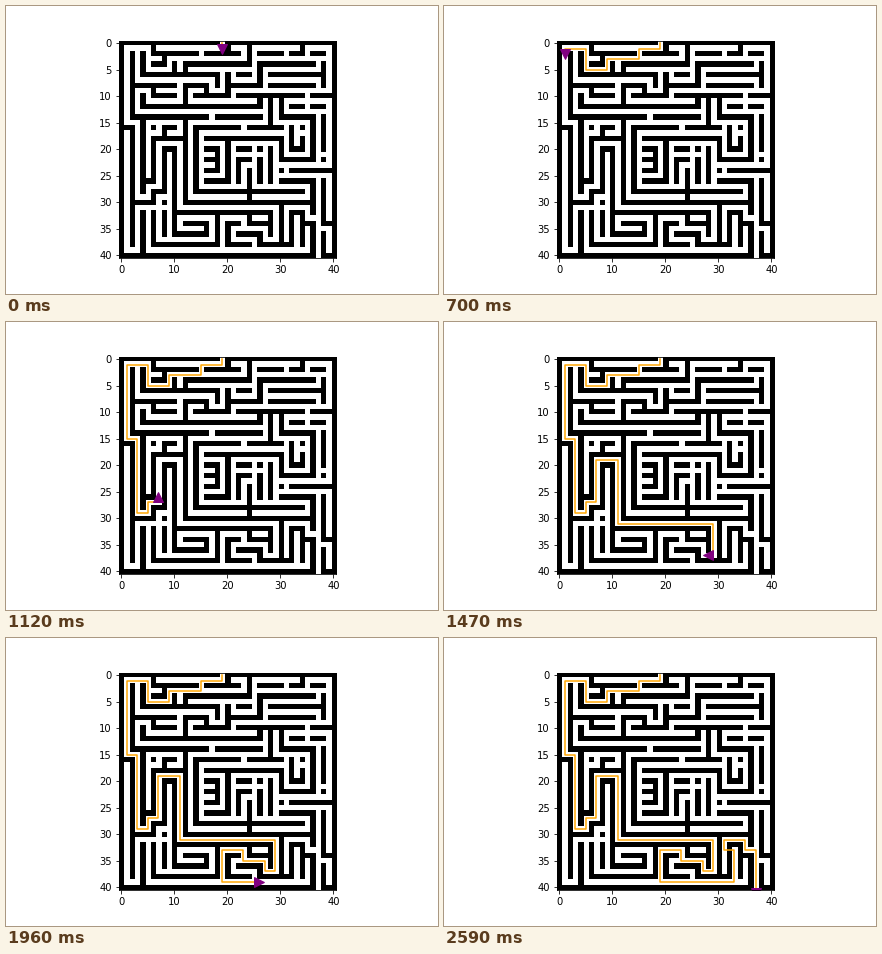
These frames come from a looping animation (432x288 px, 2660 ms). A matplotlib script:

```python
import numpy as np
import matplotlib.pyplot as plt
from matplotlib.animation import FuncAnimation

SIZE = 41
STEP_MS = 70

maze = np.zeros((SIZE, SIZE))
maze[::2, ::2] = 1


def wall(x, y, *turns):
    """Build a wall from (x, y); turns alternate between a new x and a new y."""
    for i, end in enumerate(turns):
        if i % 2 == 0:
            maze[y, min(x, end):max(x, end) + 1] = 1
            x = end
        else:
            maze[min(y, end):max(y, end) + 1, x] = 1
            y = end


# border
wall(0, 0, 40, 40, 0, 0)

# top left
wall(6, 0, 6, 2, 14)
wall(8, 2, 8, 4, 6)
wall(16, 2, 22)
wall(20, 0, 20, 2)
wall(24, 0, 24, 4, 12, 6)
wall(10, 4, 10, 6)
wall(4, 2, 4, 6, 18, 8)
wall(2, 2, 2, 14, 16)
wall(2, 8, 10)
wall(6, 8, 6, 10, 10)
wall(12, 12, 12, 8, 16, 10)
wall(14, 10, 20, 6)
wall(4, 10, 4, 12, 26, 10)

# top right
wall(26, 2, 30)
wall(34, 0, 34, 2, 32)
wall(36, 2, 38)
wall(20, 8, 26, 4, 36)
wall(22, 6, 24)
wall(28, 6, 38)
wall(38, 4, 38, 8)
wall(28, 8, 36)
wall(22, 10, 34)
wall(36, 10, 40)
wall(28, 10, 28, 16)
wall(30, 10, 30, 14)
wall(32, 12, 34)
wall(36, 12, 38)
wall(18, 14, 26)
wall(30, 14, 36, 22)
wall(38, 14, 38, 20)

# left side
wall(0, 16, 2, 38)
wall(4, 14, 4, 26, 6, 18, 12)
wall(4, 26, 4, 28)
wall(8, 18, 8, 16, 10)
wall(2, 30, 6, 28, 8, 20, 10, 36, 16, 34, 12)
wall(4, 32, 4, 40)
wall(6, 38, 6, 32)
wall(8, 32, 8, 36)
wall(6, 38, 18, 32)

# centre
wall(12, 14, 12, 30, 36, 32)
wall(14, 28, 14, 16, 22)
wall(14, 28, 34)
wall(16, 18, 30, 22, 36)
wall(16, 20, 18, 24, 16)
wall(16, 22, 18)
wall(16, 26, 20, 18)
wall(22, 26, 22, 22, 24)
wall(22, 20, 24)
wall(24, 24, 24, 30)
wall(26, 22, 26, 26)
wall(28, 20, 28, 26)
wall(24, 16, 30)

# right side
wall(32, 16, 32, 20, 34, 18)
wall(32, 24, 40)
wall(30, 26, 36, 30)
wall(38, 26, 38, 34, 40)

# bottom
wall(10, 32, 28, 36)
wall(24, 32, 24, 34, 28)
wall(22, 34, 20, 38, 24)
wall(22, 36, 26, 38, 32)
wall(30, 30, 30, 38)
wall(32, 38, 32, 32, 34, 38)
wall(34, 34, 36, 40)
wall(38, 36, 38, 40)

# entrance and exit
maze[0, 19] = maze[40, 37] = 0

# Each stop is a corner of the route or a side passage on a straight.
stops = [(19, 0)]
for axis, values in (
    ("y", [1]), ("x", [15]), ("y", [3]), ("x", [11, 9]), ("y", [5]),
    ("x", [5]), ("y", [3, 1]), ("x", [1]), ("y", [15]), ("x", [3]),
    ("y", [29]), ("x", [5]), ("y", [27]), ("x", [7]), ("y", [19]),
    ("x", [11]), ("y", [31]), ("x", [29]), ("y", [37]), ("x", [27]),
    ("y", [35]), ("x", [23]), ("y", [33]), ("x", [19]), ("y", [39]),
    ("x", [25, 33]), ("y", [33]), ("x", [31]), ("y", [31]), ("x", [35]),
    ("y", [33]), ("x", [37]), ("y", [35, 40]),
):
    for v in values:
        x, y = stops[-1]
        stops.append((v, y) if axis == "x" else (x, v))
stops = np.array(stops)

headings = np.sign(np.diff(stops, axis=0))
headings = np.vstack([headings, headings[-1:]])
SHAPES = {(0, 1): "v", (0, -1): "^", (1, 0): ">", (-1, 0): "<"}

fig = plt.figure(figsize=(6, 4), dpi=72, facecolor="white")
ax = fig.add_axes([0.125, 0.125, 0.775, 0.755])
ax.imshow(maze, cmap="binary", interpolation="nearest")
ax.set_xlim(-0.5, SIZE - 0.5)
ax.set_ylim(SIZE - 0.5, -0.5)
ax.set_xticks(range(0, SIZE, 10))
ax.set_yticks(range(0, SIZE, 5))

trail, = ax.plot([], [], color="orange", lw=1.5)
walker, = ax.plot([], [], color="purple", ls="", marker="v", ms=10)


def update(i):
    head = stops[i] + headings[i]
    route = np.vstack([stops[:i + 1], head])
    trail.set_data(route[:, 0], route[:, 1])
    walker.set_data([head[0]], [head[1]])
    walker.set_marker(SHAPES[tuple(int(d) for d in headings[i])])
    return trail, walker


anim = FuncAnimation(fig, update, frames=len(stops), interval=STEP_MS,
                     repeat=True, repeat_delay=0)
plt.show()
```
